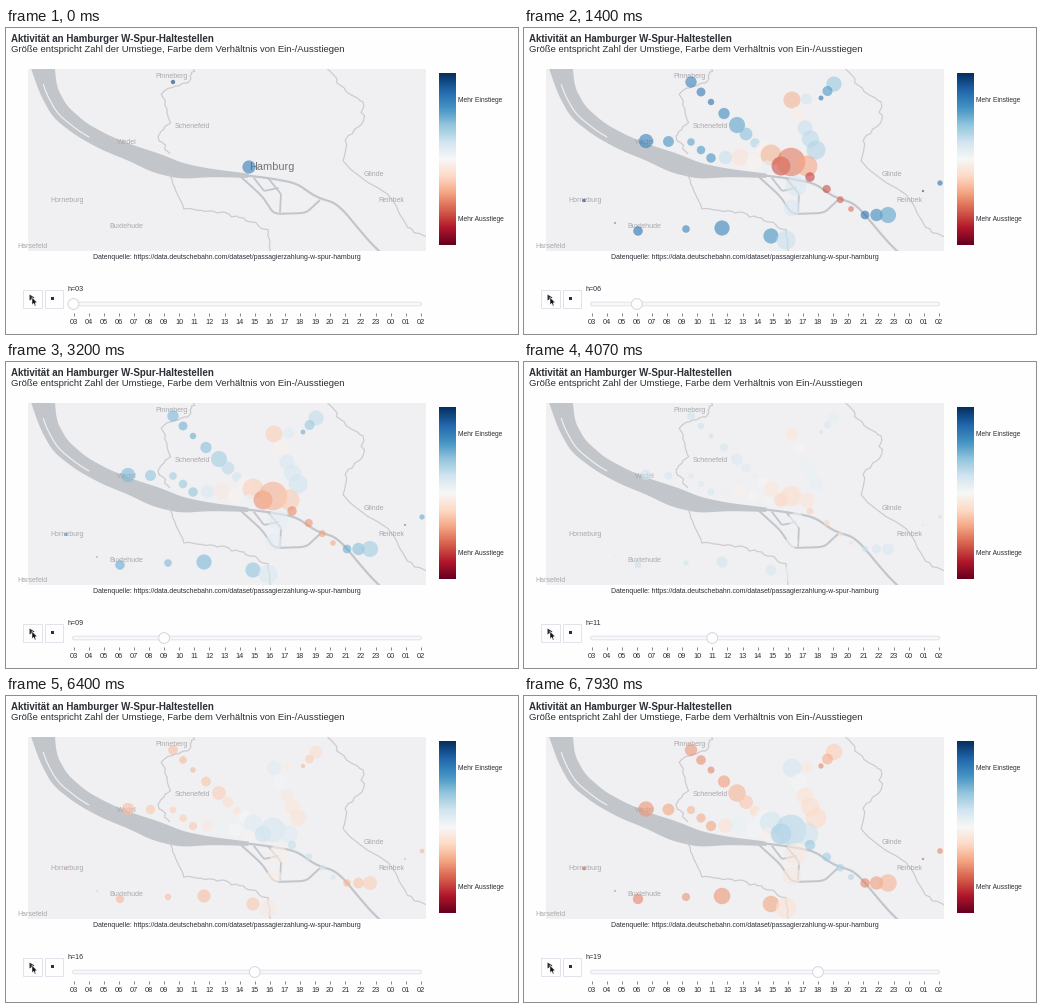
Write a matplotlib script that moves like this. It is 512 by 306 pixels and loops after 8 s.

```python
import numpy as np
import matplotlib.pyplot as plt
from matplotlib.animation import FuncAnimation
from matplotlib.collections import LineCollection
from matplotlib.patches import Circle, FancyBboxPatch, Polygon, Rectangle

W, H, DPI = 512, 306, 100
PT = 72 / DPI
LOOP, STEP = 8000, 40
FIRST, LAST = 3, 19
START, PERIOD = 220, 510     # first hour change, time per hour
LAG, MORPH = 60, 100         # the plot follows its label

PAGE, LAND, WATER = "#fefefe", "#f0f0f2", "#c2c6ca"
BORDER, PLACE, INK, FRAME = "#cbcbd0", "#a9a9ad", "#2c2f36", "#e2e2ea"

plt.rcParams["font.family"] = "Liberation Sans"
fig = plt.figure(figsize=(W / DPI, H / DPI), dpi=DPI, facecolor=PAGE)
ax = fig.add_axes([0, 0, 1, 1])
ax.axis("off")
cmap = plt.get_cmap("RdBu")


def text(x, y, s, size, color=INK, **kw):
    return ax.text(x, y, s, fontsize=size * PT, color=color, va="center", **kw)


def along(keys, n):
    """n rows spread evenly over the key rows."""
    keys = np.array(keys, float)
    u = np.linspace(0, len(keys) - 1, n)
    return np.column_stack([np.interp(u, range(len(keys)), col) for col in keys.T])


def smooth(keys, n=60):
    """Rounded path: the key path after a short moving average."""
    p = along(keys, n)
    q = np.pad(p, ((3, 3), (0, 0)), mode="edge")
    return sum(q[i:i + n] for i in range(7)) / 7


# Map
area = Rectangle((22, 41), 398, 182, fc=LAND, ec="none", zorder=0)
ax.add_patch(area)


def on_map(artist):
    artist.set_clip_path(area)
    return artist


def line(pts, color, width, z):
    on_map(ax.plot(*pts.T, color=color, lw=width * PT, zorder=z,
                   solid_joinstyle="round")[0])


# Broad river: centre line and half width
river = smooth([(35, 30, 13), (42, 62, 9), (54, 84, 9), (76, 102, 8), (100, 115, 8),
                (125, 125, 8), (150, 135, 10), (175, 143, 8), (205, 145, 4),
                (246, 148, 2)], 90)
mid, half = river[:, :2], river[:, 2:]
slope = np.gradient(mid, axis=0)
normal = np.column_stack([-slope[:, 1], slope[:, 0]]) / np.hypot(*slope.T)[:, None]
banks = np.vstack([mid + normal * half, (mid - normal * half)[::-1]])
on_map(ax.add_patch(Polygon(banks, fc=WATER, ec="none", zorder=1)))
line((mid + normal * half * .35)[8:34], LAND, 1.2, 1.1)

for keys, width in [
        ([(236, 147), (262, 150), (290, 155), (310, 169), (332, 176), (362, 212),
          (376, 226)], 2.2),
        ([(234, 148), (256, 168), (268, 186), (300, 185), (314, 172)], 2),
        ([(248, 150), (258, 163), (272, 160)], 1.8),
        ([(262, 150), (275, 166), (274, 184)], 1.8)]:
    line(smooth(keys), WATER, width, 1)

rng = np.random.default_rng(4)
for keys in [
        [(188, 41), (183, 54), (156, 64), (164, 94), (151, 108), (165, 127)],
        [(164, 146), (177, 180), (206, 183), (234, 189), (262, 202), (264, 223)],
        [(322, 41), (340, 64), (357, 73), (358, 95), (340, 109), (338, 136),
         (384, 168), (402, 200), (420, 210)]]:
    curve = along(keys, 40)
    line(curve + rng.normal(0, .8, curve.shape), BORDER, 1.2, 1.2)

for x, y, name in [(166, 48, "Pinneberg"), (186, 98.5, "Schenefeld"),
                   (121, 114, "Wedel"), (61, 173, "Horneburg"),
                   (120, 199, "Buxtehude"), (368, 147, "Glinde"),
                   (385, 172, "Reinbek"), (27, 218, "Harsefeld")]:
    on_map(text(x, y, name, 7, PLACE, ha="center", zorder=2))
city = text(266, 139.5, "Hamburg", 11, "#75757a", ha="center", zorder=2)

# Railway lines as key stations (x, y, radius, bias) and station counts.
# Bias > 0: people leave in the morning; bias < 0: they arrive.
stations = np.vstack([along(keys, n) for keys, n in [
    ([(167, 54, 6, .9), (187, 74, 3.4, 1), (213, 97, 8.5, .7), (231, 115, 5, .4),
      (247, 127, 11, -.5)], 9),
    ([(122, 113, 7.5, .9), (167, 114, 4, .7), (187, 130, 5, .8), (216, 129, 9, -.2),
      (243, 139, 7, .1)], 9),
    ([(310, 56, 8, .5), (297, 70, 2.6, 1), (268, 72, 9, -.5), (281, 100, 8, .3),
      (292, 122, 10, .4)], 9),
    ([(257, 138, 10, -.95), (267, 134, 15, -.75), (283, 138, 11, -.55)], 3),
    ([(286, 149, 5, -1), (311, 167, 4, -.9), (327, 181, 3, -.8)], 4),
    ([(341, 187, 4.6, 1), (364, 187, 8.5, .7)], 3),
    ([(114, 203, 5, 1), (162, 201, 4, .9), (198, 200, 8, .9), (247, 208, 8, .8),
      (262, 212, 10, .3)], 5),
    ([(272, 158, 11, .2), (268, 180, 9, .2)], 2),
    ([(60, 172.5, 1.8, 1.2), (91, 195, .9, 1.2)], 2),
    ([(399, 163, 1.2, 1.2), (416, 155, 2.8, 1)], 2)]])
x, y, size, bias = stations.T
NORTH, HUB = 0, 17           # the two stations already busy at night

# Traffic by hour: two rush hours; the flow turns around after midday
hours = np.arange(FIRST, LAST + 1)[:, None]
volume = np.clip((hours - 3) / 2.2, 0, 1) * (.82 + .22 * np.cos(np.pi * (hours - 7.5) / 5))
flow = .14 + .64 * np.cos(np.pi * np.clip(hours - 5, 0, 13) / 13)
radius = volume * size
ratio = np.where(bias > 0, flow, .85 * flow + .05) * bias
radius[0, [NORTH, HUB]] = 2.2, 6.6
ratio[0, [NORTH, HUB]] = .95, .7

dots = on_map(ax.scatter(x, y, s=1, linewidths=0, zorder=3))

# Titles and colour bar
text(5, 10.5, "Aktivität an Hamburger W-Spur-Haltestellen", 9.75, weight="bold")
text(5, 22, "Größe entspricht Zahl der Umstiege, Farbe dem Verhältnis von Ein-/Ausstiegen",
     9.5)
text(221, 229.5, "Datenquelle: https://data.deutschebahn.com/dataset/"
     "passagierzahlung-w-spur-hamburg", 6.9, ha="center")
ax.imshow(np.linspace(1, 0, 256)[:, None], cmap=cmap, aspect="auto",
          extent=(433, 449.5, 217.5, 46), zorder=2)
for row, s in [(72, "Mehr Einstiege"), (191.5, "Mehr Ausstiege")]:
    text(451.5, row, s, 6.65)

# Buttons and pointer
for left in (17, 38.5):
    ax.add_patch(Rectangle((left, 262), 18.5, 17.5, fc=PAGE, ec=FRAME, lw=.7))
ax.add_patch(Polygon([(23.5, 266.5), (23.5, 272.5), (28.5, 269.5)], fc=INK, ec="none"))
ax.add_patch(Rectangle((45.2, 269.2), 3.2, 3.2, fc=INK, ec="none"))
arrow = np.array([(0, 0), (0, 7.6), (1.7, 6), (2.9, 8.8), (4.1, 8.3), (3, 5.6), (5.3, 5.4)])
ax.add_patch(Polygon(arrow + (26, 269.3), fc="#111111", ec="white", lw=.35, zorder=6))

# Slider
X0, GAP = 67.5, 15.1
ax.add_patch(FancyBboxPatch((66.5, 274.2), 349, 3.6,
                            boxstyle="round,pad=0,rounding_size=1.8",
                            fc="#f8f8fb", ec=FRAME, lw=.7))
ticks = X0 + GAP * np.arange(24)
ax.add_collection(LineCollection([[(t, 284.5), (t, 288)] for t in ticks],
                                 colors="#55575e", linewidths=.5))
for i, t in enumerate(ticks):
    text(t, 294.7, f"{(FIRST + i) % 24:02d}", 7.4, ha="center")
knob = ax.add_patch(Circle((X0, 276), 5.4, fc=PAGE, ec="#d6d6e0", lw=.7, zorder=5))
label = text(62, 261.5, "", 7.2)

ax.set_xlim(0, W)
ax.set_ylim(H, 0)


def ease(t):
    t = min(max(t, 0), 1)
    return 4 * t**3 if t < .5 else 1 - 4 * (1 - t)**3


def draw(frame):
    t = frame * STEP - START
    i = max(0, int(t // PERIOD) + 1)
    prev = max(i - 1, 0)
    k = ease((t - (i - 1) * PERIOD - LAG) / MORPH)
    r = radius[prev] + (radius[i] - radius[prev]) * k
    c = ratio[prev] + (ratio[i] - ratio[prev]) * k
    dots.set_sizes((2 * r * PT)**2)
    dots.set_facecolor(cmap((np.clip(c, -1, 1) + 1) / 2, alpha=.6))
    now = prev + (i - prev) * k
    knob.center = X0 + GAP * now, 276
    city.set_alpha(max(0, 1 - now))
    label.set_text(f"h={FIRST + i:02d}")
    return dots, knob, city, label


anim = FuncAnimation(fig, draw, frames=LOOP // STEP, interval=STEP,
                     repeat=True, repeat_delay=0, blit=False)
plt.show()
```
